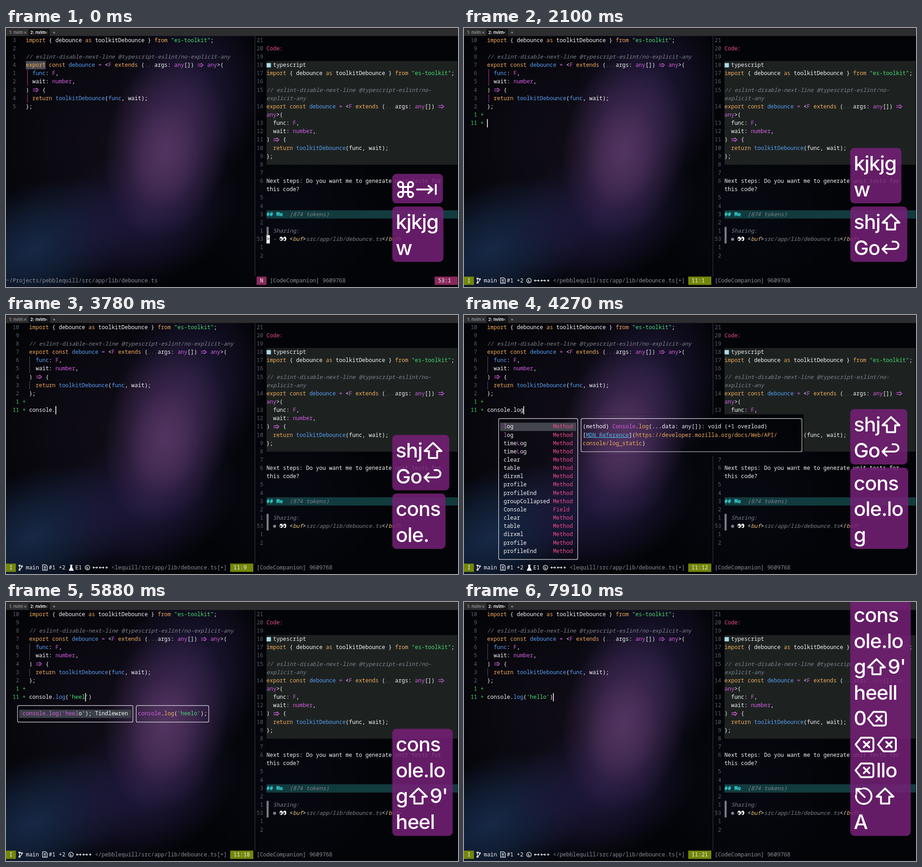
Recreate the animation shown at these times as an HTML page. Size 987 by 567 pixels, loop 8 s.

```html
<!DOCTYPE html>
<html lang="en">
<head>
<meta charset="utf-8">
<title>Editor session</title>
<style>
html, body { margin: 0; width: 100%; height: 100%; overflow: hidden; background: #030408; }
svg { display: block; width: 100vw; height: 100vh; }
text { white-space: pre; font: 12px "Noto Sans Mono", "DejaVu Sans Mono", monospace; }
.slant { font-style: italic; }
.bold { font-weight: 700; }
.line { text-decoration: underline; }
.tab { font: 9.4px Inter, Roboto, sans-serif; }
.key { font: 450 44px Inter, Roboto, sans-serif; font-optical-sizing: none; fill: #fff; }
.icon { fill: none; stroke: #fff; stroke-width: 4; stroke-linecap: round; stroke-linejoin: round; }
.box { fill: none; stroke: #dcdce2; stroke-width: 1.2; }
.thin { fill: none; stroke: #f4f4f6; stroke-width: 1.3; }
</style>
</head>
<body>
<svg viewBox="0 0 987 567">
  <defs id="defs"><clipPath id="docClip"><rect x="252" y="217.5" width="489.6" height="90.8"/></clipPath></defs>
  <g id="wall"></g>
  <g id="still"></g>
  <g id="live"></g>
  <g id="pills"></g>
</svg>
<script>
const LOOP = 8000, CW = 7.2, RH = 18.15, TOP = 17.9;
const $ = id => document.getElementById(id);
const INK = {
  w: '#f4f4f6', o: '#f0ab58', m: '#d25ddc', b: '#579ff2', g: '#46dd72', c: '#7d828c', i: '#f0c070',
  k: '#ea4c8c', n: '#5a5e68', y: '#35dfe2', s: '#8b8f98', d: '#08080c', u: '#4fb0e0', h: '#35d860'
};
const LOOK = { c: 'slant', i: 'slant', y: 'bold', u: 'line' };
const esc = s => s.replace(/&/g, '&amp;').replace(/</g, '&lt;').replace(/>/g, '&gt;');
const rowTop = r => TOP + r * RH;
const rowMid = r => rowTop(r) + RH / 2;
const rect = (x, y, w, h, fill, more = '') =>
  `<rect x="${x}" y="${y}" width="${w}" height="${h}" fill="${fill}" ${more}/>`;
const cells = (col, row, n, fill, rows = 1) => rect(col * CW, rowTop(row), n * CW, rows * RH, fill);
const frame = (c0, c1, r0, r1) =>
  `<rect class="box" rx="3" x="${(c0 + .5) * CW}" y="${rowMid(r0)}" width="${(c1 - c0) * CW}" height="${(r1 - r0) * RH}"/>`;

// Markup: pieces joined by ¦, each led by its ink letter; R is a wide arrow.
function put(col, row, markup) {
  let out = '';
  for (const piece of markup.split('¦')) {
    const ink = piece[0], s = piece.slice(1), x = col * CW;
    if (ink === 'R') {
      const y = rowMid(row) - .3;
      out += `<path d="M${x + 1} ${y - 2}h10M${x + 1} ${y + 2}h10M${x + 8} ${y - 4.5}l5 4.5l-5 4.5" fill="none" stroke="${INK.m}" stroke-width="1.3"/>`;
      col += 2;
      continue;
    }
    out += `<text class="${LOOK[ink] || ''}" x="${x.toFixed(1)}" y="${(rowTop(row) + 12.7).toFixed(2)}" fill="${INK[ink]}">${esc(s)}</text>`;
    col += s.length;
  }
  return out;
}

// Wallpaper
function blob(cx, cy, rx, ry, turn, color, alpha) {
  const id = 'glow' + $('defs').children.length;
  $('defs').insertAdjacentHTML('beforeend', `<radialGradient id="${id}"><stop offset="0" stop-color="${color}"/>` +
    `<stop offset=".5" stop-color="${color}" stop-opacity=".6"/><stop offset="1" stop-color="${color}" stop-opacity="0"/></radialGradient>`);
  return `<ellipse cx="${cx}" cy="${cy}" rx="${rx}" ry="${ry}" transform="rotate(${turn} ${cx} ${cy})" fill="url(#${id})" opacity="${alpha}"/>`;
}
$('wall').innerHTML = rect(0, 0, 987, 567, '#030408') +
  blob(230, 250, 300, 300, 0, '#110d18', .9) +
  blob(60, 485, 230, 140, -25, '#1a2f52', .85) +
  blob(300, 410, 220, 150, -20, '#211a42', .85) +
  blob(400, 160, 160, 220, 15, '#231b40', .85) +
  blob(350, 260, 135, 205, 10, '#503160', .85) +
  blob(345, 280, 80, 120, 10, '#5c3b67', .55) +
  blob(620, 400, 200, 190, 0, '#080a14', .7);

const IMPORT = 'oimport¦w { debounce ¦oas¦w toolkitDebounce } ¦ofrom¦w ¦g"es-toolkit"¦w;';
const EXPORT = 'oexport const¦w ¦bdebounce¦w ¦m=¦w <¦mF¦w ¦oextends¦w (¦n...¦wargs: ¦many¦w[]) ¦R';
const HINT = 'c// eslint-disable-next-line @typescript-eslint/no-';
const WAIT = 'w  wait: ¦mnumber¦w,', BODY = 'w) ¦R¦w {';

const LEFT = [[0, IMPORT], [2, HINT + 'explicit-any'], [3, EXPORT + '¦w ¦many¦w>('], [4, 'b  func¦w: ¦mF¦w,'], [5, WAIT], [6, BODY],
  [7, 'o  return¦w ¦btoolkitDebounce¦w(¦bfunc¦w, wait);'], [8, 'w};']];
const RIGHT = [[1, 'kCode:'], [3, 'w  typescript'], [4, IMPORT], [6, HINT], [7, 'cexplicit-any'], [8, EXPORT], [9, 'many¦w>('],
  [10, 'w  func: ¦mF¦w,'], [11, WAIT], [12, BODY], [13, 'o  return¦w ¦btoolkitDebounce¦w(func, wait);'], [14, 'w};'],
  [17, 'wNext steps: Do you want me to generate unit tests for'], [18, 'wthis code?'], [21, 'y## Me¦c  (874 tokens)'], [23, 'c  Sharing:'],
  [24, 'w       <¦ibuf¦w>¦csrc/app/lib/debounce.ts¦w</¦ibuf¦w>']];

function stillLayer() {
  const tab = (x, s, ink, weight = 400) => `<text class="tab" x="${x}" y="13.2" fill="${ink}" style="font-weight:${weight}">${s}</text>`;
  const cross = x => `<path d="M${x - 2.5} 7.5l5 5m0 -5l-5 5" stroke="#aaa" stroke-width="1"/>`;
  let out = rect(0, 0, 987, 17.5, '#2d2d2f') + rect(0, 0, 987, 1, '#2a1a1b') + rect(49, 2, 47, 15.5, '#141416') +
    tab(7, '1: nvim', '#b4b4b6') + cross(42) + tab(53, '2: nvim', '#fff', 600) + cross(88) +
    '<path d="M102.5 10h5m-2.5 -2.5v5" stroke="#aaa"/>';
  out += rect(543, 17.5, 1.2, 526.5, '#34343c');
  out += rect(568.8, rowTop(3), 417, 12.5 * RH, '#1d2221') + cells(79, 21, 58, '#123b3e');
  let num = 21;
  for (let r = 0; r < 27; r++) {
    if (r === 7 || r === 9 || r === 18) continue;
    const s = String(r === 24 ? 53 : r > 24 ? r - 24 : num);
    num--;
    out += put(78 - s.length, r, 'n' + s);
  }
  for (const [r, m] of RIGHT) out += put(79, r, m);
  out += rect(569, rowMid(3) - 4.7, 9.5, 9.5, '#a9dbe6');
  for (const x of [601, 608.6]) {
    out += `<ellipse cx="${x}" cy="461.5" rx="3.5" ry="4.8" fill="#fff"/><ellipse cx="${x - 1}" cy="462.5" rx="1.6" ry="2.2" fill="#111"/>`;
  }
  return out;
}
$('still').innerHTML = stillLayer();

// Key presses
const ICONS = {
  '⌘': [44, 'M-5.5 -11a5.5 5.5 0 1 0 -5.5 5.5H11a5.5 5.5 0 1 0 -5.5 -5.5V11a5.5 5.5 0 1 0 5.5 -5.5H-11a5.5 5.5 0 1 0 5.5 5.5Z'],
  '⇥': [48, 'M-21 0H13M4 -8L13 0L4 8M20 -10V10'],
  '⇧': [48, 'M0 -17L18.5 1H9V16H-9V1H-18.5Z'],
  '↩': [48, 'M-18 2H9A8 8 0 0 0 9 -14H4M-9 -7L-18 2L-9 11'],
  '⌫': [49, 'M-8 -15H14Q19 -15 19 -10V10Q19 15 14 15H-8L-20 0ZM-2 -6L10 6M10 -6L-2 6'],
  '⎋': [45, 'M-2 -17A17 17 0 1 1 -17 -2M2 2L-16 -16M-16 -6V-16H-6']
};
const typing = [2660, 2800, 2940, 3010, 3080, 3290, 3500, 3640, 3920, 3990, 4130, 4410, 4550, 4690, 5180, 5600, 5740, 5880, 5950,
  6090, 6160, 6230, 6370, 6580, 6790, 6930, 7070, 7280, 7560, 7770];
const PILLS = [
  { lines: ['⌘⇥'], times: [], fade: [1050, 1540] },
  { lines: ['kjkjg', 'w'], times: [], fade: [2590, 2940] },
  { lines: ['shj⇧', 'Go↩'], times: [420, 560, 910, 1470, 1750, 1820, 1890], fade: [4760, 5250] },
  { lines: ['cons', 'ole.lo', "g⇧9'", 'heell', '0⌫', '⌫⌫', '⌫llo', '⎋⇧', 'A'], times: typing, fade: [9000, 9500] }
];
const LINE = 56.6;
const pen = document.createElement('canvas').getContext('2d');
pen.font = '450 44px Inter, Roboto, sans-serif';
const advance = ch => ICONS[ch] ? ICONS[ch][0] : pen.measureText(ch).width - 1.1;
const clamp = v => Math.max(0, Math.min(1, v));
const grow = (t, t0) => t0 < 0 ? 1 : 1 - (1 - clamp((t - t0) / 130)) ** 3;

function pillLayer(t) {
  let out = '', bottom = 512;
  for (const { lines, times, fade } of [...PILLS].reverse()) {
    let i = 0, height = 8, width = 0, keys = '';
    const start = times[0] ?? -1;
    if (t < start) continue;
    lines.forEach((line, n) => {
      let x = 851;
      [...line].forEach((ch, k) => {
        const at = times[i++] ?? -1;
        if (t < at) return;
        if (k === 0) height += LINE * grow(t, at);
        const y = LINE * (n + 1) - 7.2;
        keys += ICONS[ch] ? `<path class="icon" transform="translate(${x + ICONS[ch][0] / 2 - .5} ${y - 15})" d="${ICONS[ch][1]}"/>`
          : `<text class="key" x="${x.toFixed(1)}" y="${y}">${esc(ch)}</text>`;
        x += advance(ch);
      });
      width = Math.max(width, x - 843.5 + 11);
    });
    const seen = 1 - clamp((t - fade[0]) / (fade[1] - fade[0])), open = grow(t, start);
    if (seen > 0) {
      out = `<g opacity="${(seen * open).toFixed(3)}" transform="translate(0 ${(bottom - height).toFixed(2)})">` +
        rect(843.5, 0, width, height, '#741f76', 'rx="9" fill-opacity=".87"') + keys + '</g>' + out;
    }
    bottom -= (height + 7) * open;
  }
  return out;
}

const strokes = [...PILLS[3].lines.join('')];
function typed(t) {
  let s = '';
  strokes.forEach((ch, i) => {
    if (t < typing[i] || '⇧⎋A'.includes(ch)) return;
    s = ch === '⌫' ? s.slice(0, -1) : s + (ch === '9' ? '(' : ch);
  });
  return s;
}

// Status line
const PATH = '~/Projects/pebblequill/src/app/lib/debounce.ts';
const at = (x, d) => `<path class="thin" transform="translate(${x} ${rowMid(29) - .4})" d="${d}"/>`;
const clock = x => at(x, 'M-5 0a5 5 0 1 0 10 0a5 5 0 1 0 -10 0M-1.2 -2.5V2H2');
const arrows = x => [0, 14].map(d => at(x + d, 'M1 0H11M3 -2L1 0L3 2M9 -2L11 0L9 2')).join('') + at(x + 31, 'M-2.7 0H2.7M0 -2.7V2.7');

function status(s) {
  const tint = s.insert ? '#74870a' : '#8a2a5c';
  if (!s.focus) {
    return put(0, 29, 's' + PATH) + cells(76, 29, 3, tint) + put(77, 29, 'wN') + put(80, 29, 's[CodeCompanion] 9609768') +
      cells(130, 29, 7, tint) + put(131, 29, 'w53:1');
  }
  const begin = s.error ? 32 : s.signs ? 27 : 23, full = PATH + '[+]';
  const x = (begin - 7.3) * CW;
  return cells(0, 29, 3, tint) + put(1, 29, s.insert ? 'wI' : 'wN') +
    at(32, 'M-2.5 -5V5M-2.5 3Q2.5 2 2.5 -2M1 -4h3v2h-3zM-4 -5.5h3v2h-3zM-4 4h3v2h-3z') + put(6, 29, 'wmain') +
    at(85, 'M-5 -6H2L5 -3V6H-5ZM-2.5 -1H2.5M0 -3.5V1.5M-2.5 3.5H2.5') + put(13, 29, s.signs ? 'w#1 +2' : 'w-') +
    (s.error ? `<path transform="translate(142.5 ${rowMid(29)})" d="M-3 -6H3M-1.5 -6V-1L-5 6H5L1.5 -1V-6Z" fill="#f4f4f6" stroke="#f4f4f6"/>` + put(21, 29, 'wE1') : '') +
    clock(x) + arrows(x + 11) + put(begin, 29, 's<' + full.slice(begin - 66)) +
    cells(68, 29, 7, tint) + put(s.row < 9 ? 70 : 69, 29, `w${s.row + 1}:${s.col + 1}`) + put(76, 29, 's[CodeCompanion] 9609768');
}

// Completion windows
const METHODS = 'log log timeLog timeLog clear table dirxml profile profileEnd groupCollapsed Console clear table dirxml profile profileEnd'.split(' ');
function menu() {
  let out = '<use href="#wall" clip-path="url(#docClip)"/>' + rect(79, rowTop(12), 166, RH, '#43454d') + frame(10, 34, 11, 28) + frame(35, 102, 11, 15);
  METHODS.forEach((name, i) => {
    const label = i < 2 ? 'ml¦wog' : i < 4 ? 'wtime¦mL¦wog' : 'w' + name;
    out += put(12, 12 + i, label) + put(27, 12 + i, name === 'Console' ? 'kField' : 'kMethod');
  });
  return out + put(36, 12, 'w(method) ¦mConsole¦w.¦olog¦w(...data: any[]): void (+1 overload)') +
    put(36, 13, 'w[¦uMDN Reference¦w](¦ohttps://developer.mozilla.org/docs/Web/API/') + put(36, 14, 'oconsole/log_static¦w)');
}
function suggestion(before, t) {
  const word = t < 6580 ? 'heelo' : 'hello', line = `console.log('${word}');`;
  let n = 0;
  while (n < before.length && before[n] === line[n]) n++;
  return rect(28.8, rowTop(12), 244.8, RH, '#3c4048') + frame(3, 38, 11, 13) + frame(39, 61, 11, 13) +
    put(5, 12, `m${line.slice(0, n)}¦w${line.slice(n)} Tindlewren`) +
    put(40, 12, `mconsole¦w.¦olog¦w(¦g'${word}'¦w);`);
}

function stateAt(t) {
  const before = typed(t), normal = t >= 7280 && t < 7770;
  const after = t >= 4690 ? "')" : t >= 4550 ? ')' : '';
  const row = t < 910 ? 3 : t < 1750 ? 4 : t < 1820 ? 8 : t < 1890 ? 9 : 10;
  const col = normal ? before.length - 1 : before.length + (t >= 7770 ? 2 : 0);
  return { before, after, row, col, focus: t >= 560, insert: t >= 1820 && !normal,
    signs: t >= 2100, error: t >= 2800 && t < 4760 };
}

function liveLayer(t) {
  const s = stateAt(t), wide = s.row > 8, c0 = wide ? 7 : 6, x0 = c0 * CW, rows = Math.max(9, s.row + 1);
  let out = '';
  for (let r = 0; r < rows; r++) {
    const label = String(r === s.row ? r + 1 : Math.abs(r - s.row)), fresh = s.signs && r > 8;
    out += put(wide ? 4 - label.length : 2, r, (fresh ? 'h' : 'n') + label) + (fresh ? put(5, r, 'h+') : '');
  }
  if (!s.focus) out += cells(c0, 3, 6, '#4b4b52');
  for (const [r, m] of LEFT) out += put(c0, r, m);

  const lit = t < 2660, gx = x0 + (lit ? 3 : .6), guide = lit ? '#a02f72' : '#44464e';
  const bars = rect(gx, rowTop(4), 1.3, 2 * RH, guide) + rect(gx, rowTop(7), 1.3, RH, guide);
  if (s.row === 4) out += rect(x0, rowTop(4) - 3, 432, 1, '#35483f');

  const open = s.before.indexOf('(');
  if (open < 0) out += put(c0, 10, 'w' + s.before);
  else {
    const quoted = (s.before + s.after).slice(open + 1, -1);
    out += put(c0, 10, `wconsole.¦${t >= 4760 ? 'b' : 'w'}log¦w(¦g${quoted}¦w)`);
  }
  if (s.focus) {
    out += rect(569, rowTop(23), 4.5, 2 * RH, '#777a82') + '<circle cx="586.5" cy="462.5" r="3.3" fill="#7d828c"/>';
    const letter = s.row === 3 ? 'e' : s.row === 8 ? '}' : s.row === 10 ? s.before.slice(-1) : '';
    if (s.insert) out += rect((c0 + s.col) * CW, rowTop(s.row), 1.6, RH, '#fff');
    else out += cells(c0 + s.col, s.row, 1, '#fff') + put(c0 + s.col, s.row, 'd' + letter);
  } else {
    out += rect(569, rowTop(23), 4.5, RH, '#777a82') + cells(79, 24, 1, '#fff') + put(79, 24, 'd>') + put(81, 24, 'c-');
  }
  out += bars + status(s);
  if (t >= 3990 && t < 4410) out += menu();
  if (t >= 5670 && t < 7280) out += suggestion(s.before, t);
  return out;
}

const last = {};
function show(id, html) {
  if (last[id] !== html) $(id).innerHTML = last[id] = html;
}
function draw(now) {
  const t = now % LOOP;
  show('live', liveLayer(t));
  show('pills', pillLayer(t));
  requestAnimationFrame(draw);
}
draw(0);
</script>
</body>
</html>
```
